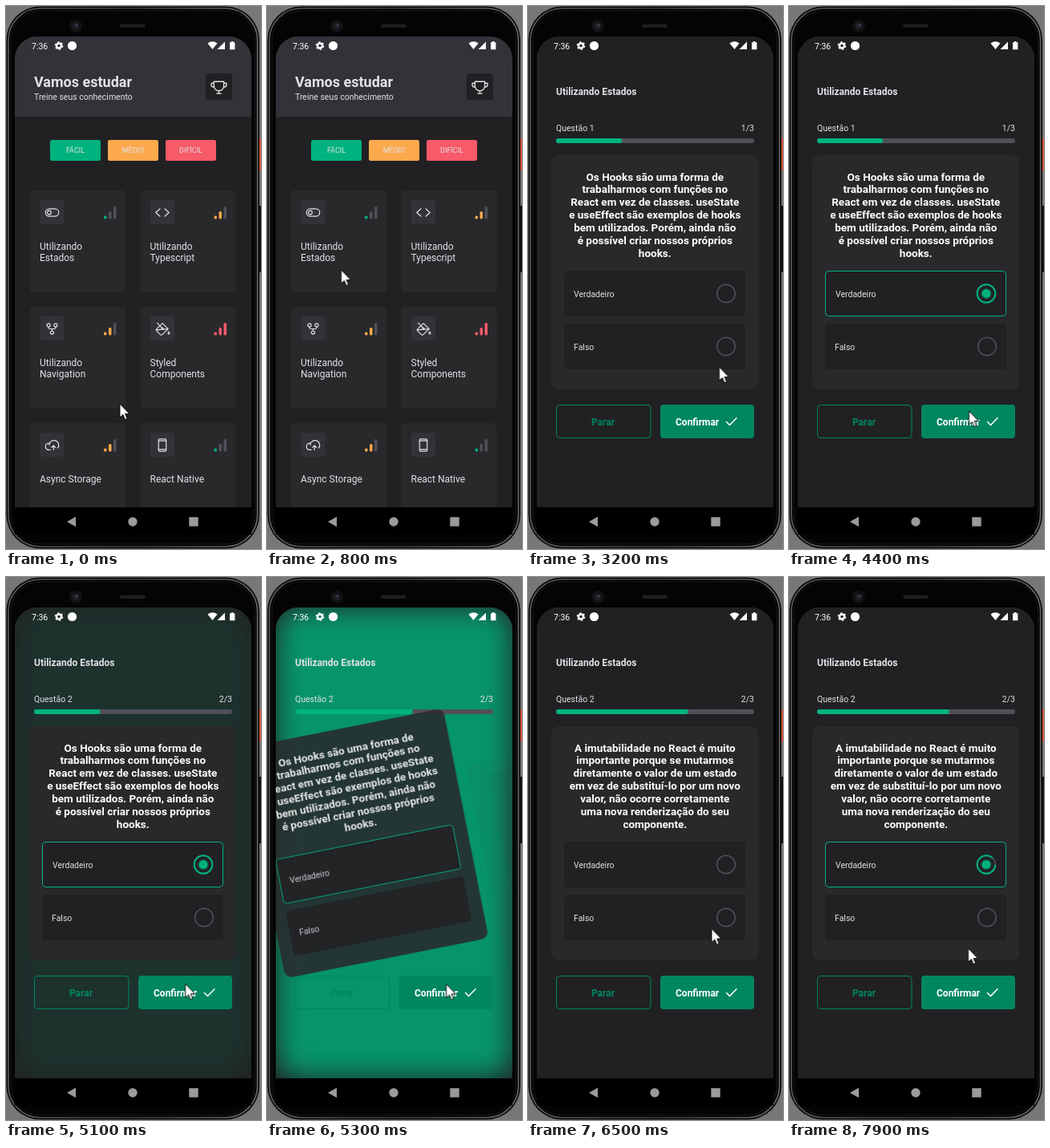
An HTML page that plays this animation: 318x677 px, repeating every 8 s.

```html
<!DOCTYPE html>
<html lang="pt-BR">
<head>
<meta charset="utf-8">
<title>Quiz</title>
<style>
:root {
  --t: 0ms;
  --bg: #212123; --card: #29292c; --head: #323238; --grey: #505059; --text: #e1e1e6;
  --green: #00b37e; --deep: #00875f; --orange: #fba94c; --red: #f75a68;
  --quad: cubic-bezier(.455, .03, .515, .955);
}
html, body { margin: 0; width: 100%; height: 100%; overflow: hidden; background: #777779; }
svg { display: block; width: 318px; height: 677px; }
text { font: 10.5px Roboto, sans-serif; fill: var(--text); }
.title { font: 700 18px Roboto, sans-serif; }
.label { font-size: 12px; }
.pill { font-size: 9px; text-anchor: middle; }
.bold { font: 700 12px Roboto, sans-serif; }
.ask { font: 700 13.5px Roboto, sans-serif; fill: #fff; text-anchor: middle; }
.icon { fill: none; stroke: var(--text); stroke-width: 16; stroke-linecap: round; stroke-linejoin: round; }

/* Every animation is paused; the clock --t moves it through its delay. */
.home, .quiz { transform-origin: 158.5px 331.5px; }
.home { animation: grow .18s cubic-bezier(.05, .7, .1, 1) calc(1.65s - var(--t)) both paused; }
.quiz { animation: settle .18s cubic-bezier(.05, .7, .1, 1) calc(1.65s - var(--t)) both paused,
                   on .25s linear calc(1.65s - var(--t)) both paused; }
.press { animation: dim .2s linear calc(var(--s) - var(--t)) paused; }
.on { animation: on 1ms linear calc(var(--s) - var(--t)) both paused; }
.off { animation: off 1ms linear calc(var(--s) - var(--t)) both paused; }
.right { animation: right 1ms linear calc(var(--s) - var(--t)) both paused; }
.left { animation: left 1ms linear calc(var(--s) - var(--t)) both paused; }
.ring { stroke-dasharray: 100; animation: draw .7s linear calc(var(--s) - var(--t)) both paused; }
.dot { transform-box: fill-box; transform-origin: center; filter: drop-shadow(0 0 1.5px var(--green));
       animation: pop .4s ease-out calc(var(--s) - var(--t)) both paused; }
.question { transform-origin: 158.3px 332px; }
.first { animation: enter .4s linear calc(1.95s - var(--t)) both paused,
                    leave .4s linear calc(5.25s - var(--t)) forwards paused; }
.second { animation: enter .4s linear calc(5.25s - var(--t)) both paused; }
/* Each layer of a card fades by itself, so the layers below shine through. */
.first .layer { animation: appear .4s linear calc(1.95s - var(--t)) both paused,
                           off .4s linear calc(5.25s - var(--t)) forwards paused; }
.second .layer { animation: appear .4s linear calc(5.25s - var(--t)) both paused; }
.bar { width: 164.7px; animation: fill .3s var(--quad) calc(5.1s - var(--t)) both paused; }
.glow { filter: blur(17px); animation: bounce .4s linear calc(5.05s - var(--t)) both paused,
                                       off .3s var(--quad) calc(5.45s - var(--t)) forwards paused; }
.cursor { animation: move 8s ease-in-out calc(0s - var(--t)) both paused; }

@keyframes grow { to { transform: scale(1.15); } }
@keyframes settle { from { transform: scale(.85); } }
@keyframes on { from { opacity: 0; } }
@keyframes off { to { opacity: 0; } }
@keyframes dim { from, to { opacity: .6; } }
@keyframes right { to { transform: translateX(1px); } }
@keyframes left { to { transform: translateX(-1px); } }
@keyframes draw { from { stroke-dashoffset: 100; } to { stroke-dashoffset: 0; } }
@keyframes pop { from { transform: scale(0); } }
@keyframes fill { from { width: 82.3px; } }
@keyframes appear { from { opacity: 0; } 70% { opacity: .3; } to { opacity: 1; } }
@keyframes enter {
  from { transform: translateX(295px) rotate(90deg); }
  to { transform: translateX(0) rotate(0deg); }
}
@keyframes leave {
  from { transform: translateX(0) rotate(0deg); }
  to { transform: translateX(-295px) rotate(-90deg); }
}
@keyframes bounce {
  0% { opacity: 0; animation-timing-function: cubic-bezier(.11, 0, .5, 0); }
  36.4% { opacity: 1; animation-timing-function: cubic-bezier(.5, 1, .89, 1); }
  54.5% { opacity: .75; animation-timing-function: cubic-bezier(.11, 0, .5, 0); }
  72.7% { opacity: 1; animation-timing-function: cubic-bezier(.5, 1, .89, 1); }
  81.8% { opacity: .94; animation-timing-function: cubic-bezier(.11, 0, .5, 0); }
  90.9%, 100% { opacity: 1; }
}
@keyframes move {
  0% { transform: translate(142px, 496px); }
  10%, 32.5% { transform: translate(92.5px, 329px); }
  37.5%, 38.75% { transform: translate(262px, 519px); }
  40% { transform: translate(238.5px, 450px); }
  43.75%, 46.25% { transform: translate(240px, 362px); }
  50% { transform: translate(226px, 516px); }
  52.5%, 56% { transform: translate(224.5px, 505px); }
  66.25% { transform: translate(223.5px, 507.5px); }
  70%, 73.75% { transform: translate(222.5px, 508px); }
  77.5% { transform: translate(204px, 500px); }
  85% { transform: translate(254px, 377px); }
  87.5%, 91.25% { transform: translate(246px, 358px); }
  95% { transform: translate(224px, 502px); }
  98.75%, 100% { transform: translate(223.5px, 463px); }
}
</style>
</head>
<body>
<svg viewBox="0 0 318 677" xmlns="http://www.w3.org/2000/svg">
  <defs>
    <clipPath id="screen"><path d="M11 625V66a28 28 0 0 1 28-28H278a28 28 0 0 1 28 28V625z"/></clipPath>
    <linearGradient id="rim">
      <stop offset="0" stop-color="#5c5c5f"/><stop offset=".5" stop-color="#3c3c3f"/><stop offset="1" stop-color="#6a6a6d"/>
    </linearGradient>
  </defs>

  <g id="phone">
    <rect x="314" y="165" width="4" height="40" fill="#d9553f"/>
    <rect x="314" y="249" width="4" height="83" fill="#101011"/>
    <rect x=".5" y=".5" width="315.5" height="676" rx="42" fill="#0a0a0b"/>
    <rect x="3" y="3" width="310.5" height="671" rx="39.5" fill="#000" stroke="url(#rim)" stroke-width="1.6"/>
    <rect x="6" y="6" width="304.5" height="665" rx="36.5" fill="#040405" stroke="#1c1c1e"/>
    <circle cx="87" cy="25" r="8" fill="#121214"/>
    <circle cx="87" cy="25" r="4" fill="#1d2026"/>
    <circle cx="88" cy="24" r="1.6" fill="#3a4150"/>
    <rect x="142" y="22.5" width="32" height="4.5" rx="2.2" fill="#1e1e20"/>
    <rect x="11" y="625" width="295" height="34" fill="#000"/>
    <g fill="#9b9b9b">
      <path d="M76 643l11-6.3v12.6z"/>
      <circle cx="158" cy="643" r="5.7"/>
      <rect x="228.3" y="637.3" width="11.4" height="11.4"/>
    </g>
  </g>

  <g clip-path="url(#screen)">
    <rect x="11" y="38" width="295" height="587" fill="var(--bg)"/>
    <g class="home" id="home">
      <rect x="11" y="38" width="295" height="100" fill="var(--head)"/>
      <text class="title" x="35" y="100.5">Vamos estudar</text>
      <text x="35" y="117">Treine seus conhecimento</text>
      <rect x="249" y="84" width="33" height="33" rx="4" fill="var(--bg)"/>
    </g>
    <g class="quiz">
      <rect x="11" y="38" width="295" height="587" fill="var(--bg)"/>
      <rect class="glow" x="11" y="38" width="295" height="587" rx="28" fill="var(--green)"/>
      <text class="bold" x="35" y="110.5">Utilizando Estados</text>
      <g class="off" style="--s:4.89s">
        <text x="35" y="156">Questão 1</text>
        <text x="282" y="156" text-anchor="end">1/3</text>
      </g>
      <g class="on" style="--s:4.89s">
        <text x="35" y="156">Questão 2</text>
        <text x="282" y="156" text-anchor="end">2/3</text>
      </g>
      <rect x="35" y="165" width="247" height="6" rx="3" fill="var(--grey)"/>
      <rect class="bar" x="35" y="165" height="6" rx="3" fill="var(--green)"/>
      <rect x="35.5" y="497.5" width="117.5" height="41" rx="4" fill="none" stroke="var(--deep)"/>
      <text class="bold" x="93.5" y="522.5" text-anchor="middle" style="fill:var(--deep)">Parar</text>
      <g class="press" style="--s:4.69s">
        <rect x="165" y="497" width="117" height="42" rx="4" fill="var(--deep)"/>
        <text class="bold" x="184" y="522.5" style="fill:#fff">Confirmar</text>
        <path d="M247.5 518.5l4 4 8.5-8.7" fill="none" stroke="#fff" stroke-width="1.5" stroke-linecap="round" stroke-linejoin="round"/>
      </g>
      <g id="questions"></g>
    </g>
  </g>

  <g id="status" fill="#fff">
    <text x="32" y="53.5" font-weight="500" style="fill:#fff">7:36</text>
    <circle cx="66" cy="49.5" r="3" fill="none" stroke="#fff" stroke-width="2.4"/>
    <circle cx="66" cy="49.5" r="4.5" fill="none" stroke="#fff" stroke-width="1.6" stroke-dasharray="2.35"/>
    <circle cx="82.5" cy="49.5" r="5.6"/>
    <path d="M251.5 46.5q6-4.6 12 0l-6 7.5z"/>
    <path d="M273 44.5v9.5h-9.5z"/>
    <path d="M279 45.3h2v-1.3h2.4v1.3h2V54.2H279z"/>
  </g>

  <path class="cursor" d="M0 0V17l3.9-3.5 2.6 6.1 2.7-1.1-2.6-6h5.3z" fill="#fff" stroke="#000" stroke-width=".9"/>
</svg>

<script>
const icons = {
  toggle: '<rect x="16" y="64" width="224" height="128" rx="64"/><circle cx="80" cy="128" r="32"/>',
  code: '<path d="M88 64L16 128l72 64M168 64l72 64-72 64"/>',
  fork: '<circle cx="128" cy="190" r="28"/><circle cx="188" cy="66" r="28"/><circle cx="68" cy="66" r="28"/>' +
    '<path d="M68 94v10a24 24 0 0 0 24 24h72a24 24 0 0 0 24-24V94M128 128v34"/>',
  bucket: '<path d="M130 34l96 96-100 94a24 24 0 0 1-34 0l-60-60a24 24 0 0 1 0-34zM40 28l80 82M226 130L20 146"/>' +
    '<circle cx="130" cy="122" r="14"/><path d="M236 176q-26 36 0 42 26-6 0-42z"/>',
  cloud: '<path d="M94 208H72a56 56 0 1 1 14-110M80 128a80 80 0 1 1 144 48M118 166l34-34 34 34M152 208v-76"/>',
  mobile: '<rect x="64" y="24" width="128" height="208" rx="16"/><path d="M64 56H192M64 200H192"/>',
  trophy: '<path d="M56 48V112a72 72 0 0 0 144 0V48zM96 224h64M128 184v40M198 128h10a32 32 0 0 0 32-32V80' +
    'a8 8 0 0 0-8-8h-32M58 128H48a32 32 0 0 1-32-32V80a8 8 0 0 1 8-8h32"/>'
};
const levels = ['green', 'orange', 'red'];
const topics = [
  ['toggle', 1, 'Utilizando', 'Estados'],
  ['code', 2, 'Utilizando', 'Typescript'],
  ['fork', 2, 'Utilizando', 'Navigation'],
  ['bucket', 3, 'Styled', 'Components'],
  ['cloud', 2, 'Async Storage'],
  ['mobile', 1, 'React Native']
];
const questions = [
  { name: 'first', pick: 3.59, end: 5.249, lines: [
    'Os Hooks são uma forma de', 'trabalharmos com funções no', 'React em vez de classes. useState',
    'e useEffect são exemplos de hooks', 'bem utilizados. Porém, ainda não',
    'é possível criar nossos próprios', 'hooks.'] },
  { name: 'second', pick: 7.29, end: 9, lines: [
    'A imutabilidade no React é muito', 'importante porque se mutarmos', 'diretamente o valor de um estado',
    'em vez de substituí-lo por um novo', 'valor, não ocorre corretamente',
    'uma nova renderização do seu', 'componente.'] }
];

const icon = (name, x, y, k = .0735) =>
  `<g class="icon" transform="translate(${x} ${y}) scale(${k}) translate(-128 -128)">${icons[name]}</g>`;

const pill = (label, i) => {
  const x = 55 + i * 72;
  return `<rect x="${x}" y="167" width="63" height="26" rx="2.5" fill="var(--${levels[i]})"/>
    <text class="pill" x="${x + 31.5}" y="183.3">${label}</text>`;
};

const meter = level => [4, 9.5, 15.5].map((h, i) =>
  `<rect x="${92 + i * 6}" y="${35.5 - h}" width="3.5" height="${h}" rx="1.5"
    fill="var(--${i < level ? levels[level - 1] : 'grey'})"/>`).join('');

const topic = ([name, level, ...words], i) => {
  const x = 30 + i % 2 * 137.5, y = 230 + (i >> 1) * 145;
  const press = i ? '' : 'class="press" style="--s:1.49s"';
  return `<g transform="translate(${x} ${y})"><g ${press}>
    <rect width="119" height="127" rx="4" fill="var(--card)"/>
    <rect x="12.5" y="12" width="30" height="30" rx="3" fill="var(--head)"/>
    ${icon(name, 27.5, 27.5)}${meter(level)}
    ${words.map((w, n) => `<text class="label" x="12" y="${73.5 + n * 14.3}">${w}</text>`).join('')}
  </g></g>`;
};

const option = (label, y, end, picked) => {
  const mid = y + 28.5;
  const border = picked ? `<rect class="on" x="45.5" y="${y + .5}" width="225" height="56" rx="4"
    fill="none" stroke="var(--green)"/>` : '';
  const mark = picked ? `<circle class="ring" cx="247" cy="${mid}" r="11.3" pathLength="100"
      fill="none" stroke="var(--green)" stroke-width="2"/>
    <circle class="dot" cx="247" cy="${mid}" r="5.3" fill="var(--green)"/>` : '';
  return `<g class="layer">
    <rect x="45" y="${y}" width="226" height="57" rx="4" fill="var(--bg)"/>${border}
    <text class="${picked ? 'right' : ''}" x="57" y="${y + 32.7}">${label}</text>
    <g class="${picked ? 'left' : ''}"><g class="off" style="--s:${end}s">
      <circle cx="247" cy="${mid}" r="11.3" fill="none" stroke="var(--grey)" stroke-width="1.5"/>
    </g></g>
    <g class="${picked ? 'left' : ''}"><g class="off" style="--s:${end}s"><g style="--s:var(--pick)">${mark}</g></g></g>
  </g>`;
};

const question = ({ name, pick, end, lines }) =>
  `<g class="question ${name}" style="--s:${pick}s;--pick:${pick}s">
    <rect class="layer" x="29" y="186" width="258.5" height="292" rx="9" fill="var(--card)"/>
    <g class="layer">
      ${lines.map((l, i) => `<text class="ask" x="158.3" y="${217.5 + i * 15.85}">${l}</text>`).join('')}
    </g>
    ${option('Verdadeiro', 330, end, true)}${option('Falso', 396, end, false)}
  </g>`;

document.getElementById('home').innerHTML += icon('trophy', 265.5, 101, .085) +
  ['FÁCIL', 'MÉDIO', 'DIFÍCIL'].map(pill).join('') + topics.map(topic).join('');
document.getElementById('questions').innerHTML = questions.map(question).join('');

// The picture advances ten times a second.
const LOOP = 8000, STEP = 100, start = performance.now();
function tick() {
  const t = Math.max(0, performance.now() - start) % LOOP;
  document.documentElement.style.setProperty('--t', Math.floor(t / STEP) * STEP + 'ms');
  requestAnimationFrame(tick);
}
tick();
</script>
</body>
</html>
```
